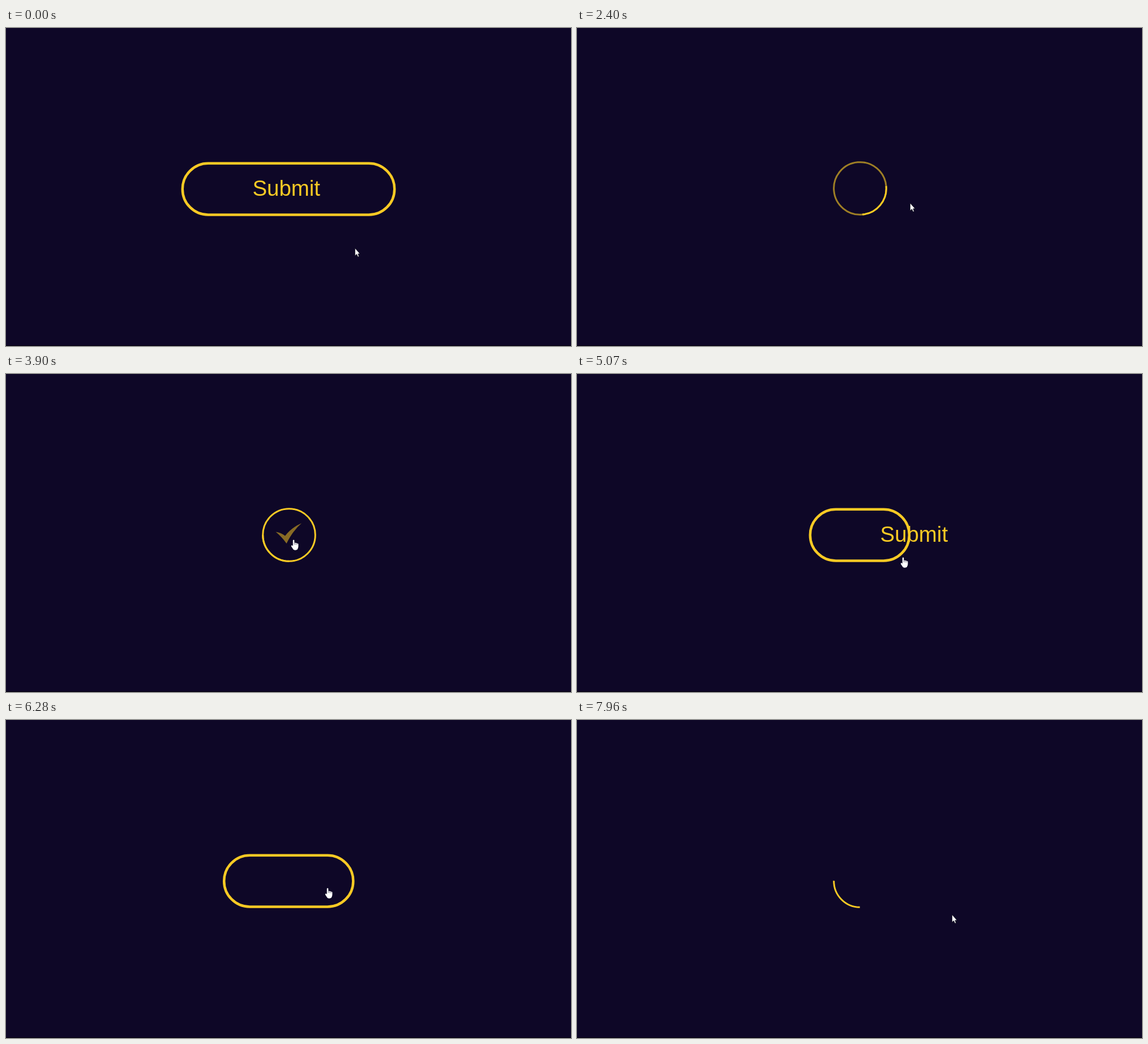
An HTML page for the animation above (7.99 s loop, 998 by 561 pixels).

```html
<!DOCTYPE html>
<html lang="en">
<head>
<meta charset="utf-8">
<title>Submit button</title>
<style>
  html, body { margin: 0; width: 100%; height: 100%; overflow: hidden; background: #0e0727; }
  svg { display: block; width: 998px; height: 561px; }
  text { font: 38.4px "Liberation Sans", Arial, sans-serif; }
</style>
</head>
<body>
<svg viewBox="0 0 998 561">
  <rect width="998" height="561" fill="#0e0727"/>
  <rect y="560" width="998" height="1" fill="#04010c"/>
  <g fill="none" stroke="#f9ca24">
    <rect id="pill" y="238.75" height="90.75" rx="45.37" stroke-width="4.5"/>
    <g id="loader" stroke-width="3">
      <circle id="ring" cx="500" cy="284" r="46.3"/>
      <path d="M500 330.3A46.3 46.3 0 0 1 453.7 284"/>
    </g>
  </g>
  <text id="label" y="295.5" fill="#f9ca24">Submit</text>
  <path id="check" fill="#f9ca24" d="M476.5 278.5Q486 280 493 285.5Q504 271 522 263.2Q507 276 495.5 299Q487 287 476.5 278.5Z"/>
  <g id="arrow">
    <path fill="#fff" stroke="#05020f" stroke-width=".6" d="M0 0V13.2L3 10.5L5 15H7L5.3 9.7H8.6Z"/>
  </g>
  <g id="hand">
    <path fill="#fff" d="M-1.2 1Q0-.8 1.3 1V5.5Q2.6 4.2 3.8 5.8Q5 4.8 6.2 6.4Q8.2 5.8 8.4 8V12Q8.2 15 6.5 17.2Q2.5 19.2-.3 17.2L-4 11.8Q-4.6 9.6-2.6 9.8L-1.2 11Z"/>
    <path fill="none" stroke="#0e0727" stroke-width=".6" d="M1.3 5.5V8.5M3.8 6V8.8M6.2 6.6V9"/>
  </g>
</svg>
<script>
const LOOP = 7990;
const WIDE = 379, NARROW = 96, MORPH = 500, SPIN = 1400;
const FIRST_CLICK = 1640, SECOND_CLICK = 6130;
const FILL_AT = 3550, CHECK_AT = 3750, RESET_AT = 4971;
const $ = id => document.getElementById(id);
const clamp = v => Math.max(0, Math.min(1, v));
const show = (el, on) => el.setAttribute("visibility", on ? "visible" : "hidden");

// CSS "ease": cubic-bezier(.25, .1, .25, 1)
function ease(x) {
  x = clamp(x);
  const bezier = (s, a, b) => 3 * s * (1 - s) ** 2 * a + 3 * s * s * (1 - s) * b + s ** 3;
  let lo = 0, hi = 1;
  for (let i = 0; i < 24; i++) {
    const mid = (lo + hi) / 2;
    if (bezier(mid, .25, .25) < x) lo = mid; else hi = mid;
  }
  return bezier(lo, .1, 1);
}
const progress = (t, start, length) => ease((t - start) / length);
const smooth = x => x * x * (3 - 2 * x);

// Pointer stops: time, x, y
const STOPS = [
  [0, 616.5, 388.5], [110, 616.5, 388.5], [780, 605, 327],
  [990, 605, 327], [1220, 600, 303], [2150, 600, 303],
  [2400, 588.5, 309], [2600, 590, 309], [3250, 522, 298],
  [3800, 508, 292.5], [4020, 508, 292.5], [4680, 576, 323.5],
  [5600, 576, 323.5], [5940, 568, 296.5], [6900, 568, 296.5],
  [7690, 662.5, 343.5], [LOOP, 662.5, 343.5]
];
function pointer(t) {
  const i = Math.max(1, STOPS.findIndex(s => s[0] > t));
  const [t0, x0, y0] = STOPS[i - 1], [t1, x1, y1] = STOPS[i];
  const k = smooth((t - t0) / (t1 - t0));
  return [x0 + (x1 - x0) * k, y0 + (y1 - y0) * k];
}

function draw(t) {
  const second = t >= 6100;
  const click = second ? SECOND_CLICK : FIRST_CLICK;
  const reset = t >= RESET_AT && !second;
  const narrow = reset ? 1 - progress(t, RESET_AT, MORPH) : progress(t, click, MORPH);
  const width = WIDE + (NARROW - WIDE) * narrow;
  const center = 499 + .5 * narrow;
  const left = center - width / 2;
  const spinAt = click + MORPH;
  const round = !reset && t >= spinAt;

  show($("pill"), !round);
  $("pill").setAttribute("x", left + 2.25);
  $("pill").setAttribute("width", width - 4.5);

  show($("label"), t < 1580 || reset);
  $("label").setAttribute("x", left + 126);

  const turn = -360 * progress(t, spinAt, SPIN);
  const fade = 1 - progress(t, spinAt + 70, 800);
  const fill = second ? 0 : progress(t, FILL_AT, 200);
  show($("loader"), round);
  $("loader").setAttribute("transform", `rotate(${turn} 499.5 283.5)`);
  $("ring").setAttribute("opacity", Math.max(fade, fill));

  const checked = t >= CHECK_AT && t < RESET_AT;
  $("check").setAttribute("opacity", checked ? progress(t, CHECK_AT, MORPH) : 0);

  const [x, y] = pointer(t);
  const hover = Math.abs(x - center) < width / 2 && Math.abs(y - 284) < 48;
  for (const [id, on] of [["arrow", !hover], ["hand", hover]]) {
    show($(id), on);
    $(id).setAttribute("transform", `translate(${x} ${y})`);
  }
}

const began = performance.now();
function tick() {
  draw((performance.now() - began) % LOOP);
  requestAnimationFrame(tick);
}
tick();
</script>
</body>
</html>
```
